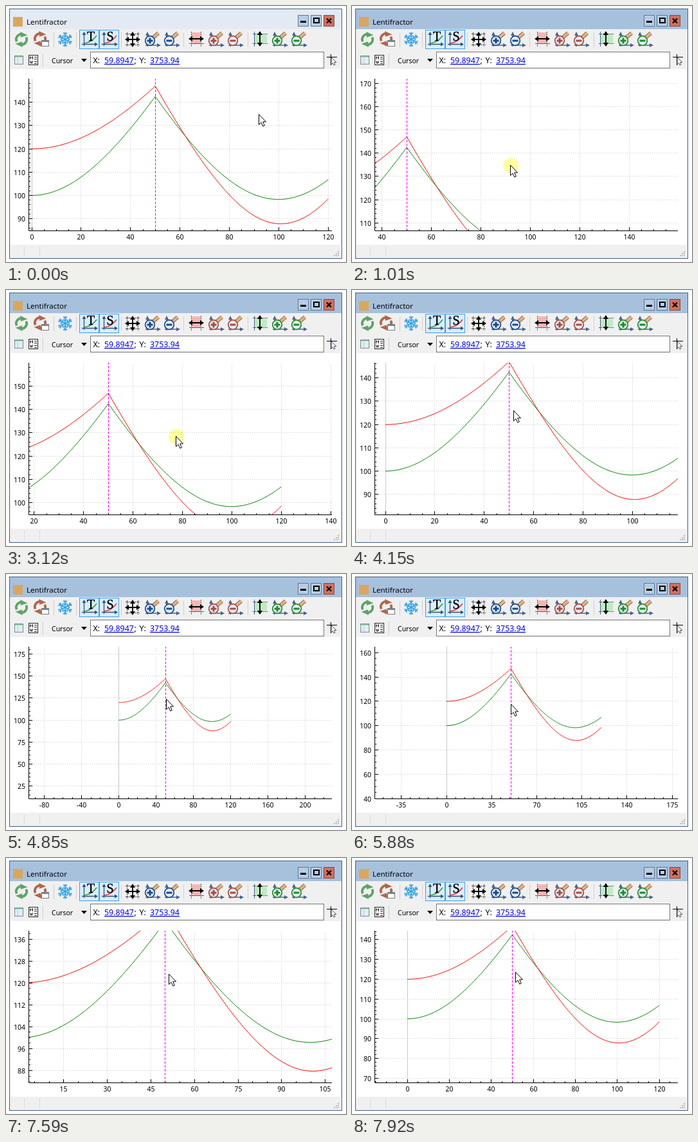
Write an HTML page with a canvas that moves like this. It is 529 px wide and 398 px high and loops after 8000 ms.

```html
<!DOCTYPE html>
<html lang="en">
<head>
<meta charset="utf-8">
<title>Lentifractor</title>
<style>
  html, body { margin: 0; width: 100%; height: 100%; overflow: hidden; background: #fff; }
  svg, canvas { position: absolute; left: 0; top: 0; width: 529px; height: 398px; }
  text { font-family: "Noto Sans", sans-serif; fill: #000; }
  .link { fill: #0000ee; text-decoration: underline; }
  .serif { font: 20px "Liberation Serif", serif; text-anchor: middle; stroke: #000; stroke-width: .4; }
  .line { fill: none; stroke: currentColor; }
  .crisp { shape-rendering: crispEdges; }
</style>
</head>
<body>
<svg viewBox="0 0 529 398">
  <defs>
    <g id="cycle" transform="rotate(-18)">
      <path class="line" stroke-width="3.800" d="M-8 1A8 8 0 0 1 4-7M8-1A8 8 0 0 1-4 7"/>
      <path fill="currentColor" d="M2-12 11-3.500H0ZM-2 12-11 3.500H0Z"/>
    </g>
    <g id="axes" fill="none" stroke="#48628c" stroke-width="1.500">
      <path d="M-8 11V-9M-11 9H10"/>
      <path d="M-11-6-8-12-5-6ZM7 6 13 9 7 12Z" fill="#48628c" stroke="none"/>
    </g>
    <g id="lens">
      <use href="#axes"/>
      <path d="M1-3 9-10" stroke="#8d6848" stroke-width="6"/>
      <path d="M1-3 9-10" stroke="#e2b184" stroke-width="4"/>
      <circle cx="-4" cy="2" r="7.300" fill="#e6edf3" stroke="currentColor" stroke-width="1.700"/>
      <path class="line" stroke-width="3" d="M-8.500 2H.5"/>
    </g>
    <g id="plus"><use href="#lens"/><path class="line" stroke-width="3" d="M-4-2.500V6.500"/></g>
    <path id="both" d="M-12 0-6-4V-.9H6V-4L12 0 6 4V.9H-6V4Z"/>
    <g id="arm"><path class="line" stroke-width="1.500" d="M0 0V-11.500M-3-10.500 0-7.500 3-10.500M-3-6.500 0-3.500 3-6.500"/></g>
    <g id="chart">
      <rect x=".5" y=".5" width="30" height="29" fill="#dcedfb" stroke="#3c9fef"/>
      <path d="M7.500 25V6M4 22.500H26" fill="none" stroke="#34507c" stroke-width="1.300"/>
      <path d="M4.500 8 7.500 3 10.500 8ZM24 19.500 29 22.500 24 25.500Z" fill="#34507c"/>
    </g>
  </defs>

  <!-- window -->
  <g class="crisp">
    <rect x="5.500" y="4.500" width="517" height="388" fill="#f0f0f0" stroke="#3f5f86"/>
    <rect id="bar" x="6" y="5" width="516" height="31"/>
    <rect x="7" y="98" width="514" height="273" fill="#fff"/>
    <path d="M28.500 374V389M52.500 374V389" stroke="#dadada"/>
    <path d="M74.500 41V64M109.500 41V64M179.500 41V64M276.500 41V64M376.500 41V64M57.500 74V95" stroke="#d0d0d0"/>
    <path d="M516 382h2M513 385h5M510 388h8" stroke="#bcbcbc" stroke-width="2" stroke-dasharray="2 1"/>
    <rect x="11" y="17" width="15" height="15" fill="#d9a75c"/>
    <g fill="#b8cde4" stroke="#5f7893">
      <rect x="454.500" y="14.500" width="16" height="17"/>
      <rect x="474.500" y="14.500" width="16" height="17"/>
      <rect x="494.500" y="14.500" width="16" height="17" fill="#d2705c" stroke="#8c473c"/>
    </g>
    <path d="M458 24.500H467" stroke="#000" stroke-width="3"/>
    <rect x="479" y="19" width="8" height="7" fill="none" stroke="#000" stroke-width="2"/>
  </g>
  <path d="M499 19.500 506 26.500M506 19.500 499 26.500" stroke="#000" stroke-width="2.200"/>
  <text x="32" y="28.500" font-size="11.500">Lentifractor</text>

  <!-- main toolbar -->
  <use href="#cycle" x="24" y="52" color="#5da466" transform="rotate(0)"/>
  <use href="#cycle" x="53" y="51" color="#b0664f"/>
  <g class="crisp"><rect x="55.500" y="53.500" width="11" height="9" fill="#fff" stroke="#777"/><path d="M56 55H66" stroke="#5a8fd0" stroke-width="2"/></g>
  <g transform="translate(92 52)" color="#2f9fe0">
    <use href="#arm"/><use href="#arm" transform="rotate(60)"/><use href="#arm" transform="rotate(120)"/>
    <use href="#arm" transform="rotate(180)"/><use href="#arm" transform="rotate(240)"/><use href="#arm" transform="rotate(300)"/>
  </g>
  <use href="#chart" x="114" y="37"/>
  <path d="M122 58Q134 56 141 46" fill="none" stroke="#2a9a3a" stroke-width="1.500"/>
  <text class="serif" x="132" y="54">T</text>
  <use href="#chart" x="145" y="37"/>
  <path d="M153 58Q165 56 172 46" fill="none" stroke="#e03030" stroke-width="1.500"/>
  <text class="serif" x="162" y="54">S</text>
  <g transform="translate(197 52)">
    <path class="crisp" d="M-8.500-11V11M8.500-11V11M-11-8.500H11M-11 8.500H11" stroke="#333" stroke-dasharray="2 1"/>
    <use href="#both"/><use href="#both" transform="rotate(90)"/>
  </g>
  <g color="#174a90"><use href="#plus" x="228" y="52"/><use href="#lens" x="258" y="52"/></g>
  <g transform="translate(296 51)">
    <rect x="-7" y="-10" width="14" height="17" fill="#f5b5b5"/>
    <path class="crisp" d="M-7.500-11V12M7.500-11V12" stroke="#555" stroke-dasharray="2 1"/>
    <path class="crisp" d="M-11 7.500H12" stroke="#48628c"/>
    <use href="#both"/>
  </g>
  <g color="#a54d42"><use href="#plus" x="327" y="52"/><use href="#lens" x="357" y="52"/></g>
  <g transform="translate(395 51)">
    <rect x="-9" y="-7" width="20" height="14" fill="#c0ebc4"/>
    <path class="crisp" d="M-11-7.500H12M-11 7.500H12" stroke="#555" stroke-dasharray="2 1"/>
    <path class="crisp" d="M-8.500-11V12" stroke="#48628c"/>
    <use href="#both" transform="rotate(90)"/>
  </g>
  <g color="#218a30"><use href="#plus" x="426" y="52"/><use href="#lens" x="456" y="52"/></g>

  <!-- cursor toolbar -->
  <g class="crisp">
    <rect x="13.500" y="77.500" width="13" height="13" fill="#fff" stroke="#6e8f9a"/>
    <path d="M14 79H26" stroke="#8cc99b" stroke-width="2"/>
    <path d="M14 82.500H26M14 85.500H26M14 88.500H26M18.500 78V90" stroke="#b5cdd8"/>
    <rect x="35.500" y="76.500" width="14" height="15" fill="#fff" stroke="#222"/>
    <path d="M44 79.500H48M44 82.500H48M44 86.500H48M44 89.500H48" stroke="#222"/>
    <rect x="131.500" y="71.500" width="363" height="25" fill="#fff" stroke="#777"/>
    <path d="M499 79.500H515M505.500 75V92" stroke="#000"/>
  </g>
  <path d="M37.500 83V78.500L39.500 81 41.500 78.500V83M37.500 85 38.500 89.500 39.500 86.500 40.500 89.500 41.500 85" fill="none" stroke="#222"/>
  <path d="M506 80V91L508.500 88.500 510 92 512 91 510.500 87.500H514Z" fill="#fff" stroke="#345" stroke-width=".9"/>
  <path d="M117 82H126L121.500 87Z"/>
  <text x="71" y="89" font-size="10.500">Cursor</text>
  <g font-size="12.400">
    <text x="135.500" y="89">X:</text><text class="link" x="153" y="89">59.8947</text>
    <text x="199.500" y="89">;</text><text x="207.500" y="89">Y:</text><text class="link" x="224" y="89">3753.94</text>
  </g>
</svg>
<canvas id="plot" width="529" height="398"></canvas>

<script>
const LOOP = 8000;
const L = 35, R = 507, T = 113, B = 350;
const ctx = document.getElementById('plot').getContext('2d');
const bar = document.getElementById('bar');

// Timeline: ox and oy are the pixels of x = 0 and y = 100, k is the wheel step.
const frames = [];
let view = { k: 0, ox: 40, oy: 294.5 };
const add = (t, x, y, held = false) => frames.push({ t, x, y, held, view });
const zoom = (t, x, y, k, ox, oy) => { view = { k, ox, oy }; add(t, x, y); };
function drag(gx, gy, moves) {
  const start = view;
  for (const [t, x, y] of moves) {
    view = { k: start.k, ox: start.ox + x - gx, oy: start.oy + y - gy };
    add(t, x, y, true);
  }
}

add(0, 394, 169);
drag(394, 169, [[330, 394, 169], [680, 322, 209], [1010, 247, 248], [1360, 184, 276], [1710, 141, 300]]);
add(2060, 143, 300);
add(2390, 90, 323);
drag(85, 323, [[2770, 155, 285], [3120, 265, 228], [3450, 350, 179]]);
add(3800, 270, 187);
add(4150, 252, 188);
zoom(4500, 252, 189, -3, 129.2, 245.4);
zoom(4850, 250, 195, -6, 175.6, 227.1);
add(5180, 252, 212);
add(5530, 251, 211);
zoom(5880, 248, 203, -4, 147, 235.7);
zoom(6210, 250, 197, -1, 83.6, 259.2);
zoom(6560, 253, 191, 2, -19.3, 297.8);
zoom(6890, 253, 185, 4, -123.9, 340.6);
zoom(7590, 254, 181, 1, 21.8, 279.4);
zoom(7920, 255, 178, -1, 86, 250);

// Beam radius: one hyperbola on each side of the lens at x = 50.
const beam = (w, c, d, x) => w * Math.hypot(1, (x - c) / d);
const green = x => x < 50 ? beam(100, 0, 49.25, x) : beam(98.3, 99.83, 47.48, x);
const red = x => x < 50 ? beam(120, 0, 70.67, x) : beam(87.8, 100.77, 37.81, x);

const PARTS = { 1: 5, 1.5: 3, 2: 4, 2.5: 5, 3: 3, 3.5: 5, 4: 4, 4.5: 3, 5: 5, 6: 3, 8: 4 };
function tickStep(range) {
  const raw = range / 6, mag = 10 ** Math.floor(Math.log10(raw)), m = raw / mag;
  const nice = m < 5 ? Math.floor(m * 2) / 2 : Math.floor(m / 2) * 2;
  return { step: nice * mag, parts: PARTS[nice] };
}
function ticks(lo, hi) {
  const { step, parts } = tickStep(hi - lo), list = [];
  const sub = step / parts;
  for (let i = Math.ceil(lo / sub); i * sub <= hi; i++) list.push({ v: i * sub, major: i % parts === 0 });
  return list;
}

const snap = p => Math.floor(p) + 0.5;
function stroke(color, points, dash = []) {
  ctx.strokeStyle = color;
  ctx.setLineDash(dash);
  ctx.beginPath();
  points.forEach(([x, y]) => ctx.lineTo(x, y));
  ctx.stroke();
}

function drawArrow(x, y, held) {
  if (held) {
    ctx.globalCompositeOperation = 'multiply';
    ctx.fillStyle = '#ffffa0';
    ctx.beginPath();
    ctx.arc(x, y, 12, 0, 7);
    ctx.fill();
    ctx.globalCompositeOperation = 'source-over';
  }
  const shape = [[0, 0], [0, 16], [3.5, 12.7], [6.3, 18.5], [8.8, 17.4], [6.2, 11.5], [11, 11.5]];
  ctx.beginPath();
  shape.forEach(([dx, dy]) => ctx.lineTo(x - 0.5 + dx, y - 0.5 + dy));
  ctx.closePath();
  ctx.fillStyle = '#fff';
  ctx.fill();
  ctx.strokeStyle = '#000';
  ctx.setLineDash([]);
  ctx.stroke();
}

function draw({ t, x, y, held, view: { k, ox, oy } }) {
  bar.setAttribute('fill', t ? '#a7c1dd' : '#e3eaf4');
  const zoomBy = 0.85 ** -k, sx = 3.845 * zoomBy, sy = 3.62 * zoomBy;
  const px = v => ox + v * sx, py = v => oy + (100 - v) * sy;
  const xs = ticks((L - ox) / sx, (R - ox) / sx);
  const ys = ticks(100 - (B - oy) / sy, 100 - (T + 1 - oy) / sy);

  ctx.clearRect(0, 0, 529, 398);
  ctx.lineWidth = 1;
  ctx.save();
  ctx.beginPath();
  ctx.rect(L, T, R - L, B - T);
  ctx.clip();
  const gridLine = (v, points) => stroke('#c8c8c8', points, v === 0 ? [] : [1, 2]);
  for (const { v, major } of xs) if (major) gridLine(v, [[snap(px(v)), B], [snap(px(v)), T]]);
  for (const { v, major } of ys) if (major) gridLine(v, [[L, snap(py(v))], [R, snap(py(v))]]);
  const samples = Array.from({ length: 241 }, (_, i) => i / 2);
  stroke('#008000', samples.map(v => [px(v), py(green(v))]));
  stroke('#ff0000', samples.map(v => [px(v), py(red(v))]));
  stroke('#ff00ff', [[snap(px(50)), B], [snap(px(50)), T]], [4, 2]);
  ctx.restore();

  const base = B - 0.5;
  stroke('#000', [[L + 0.5, T], [L + 0.5, base], [R, base]]);
  ctx.font = '10.5px "Noto Sans", sans-serif';
  ctx.fillStyle = '#000';
  ctx.textAlign = 'center';
  for (const { v, major } of xs) {
    const p = snap(px(v));
    stroke('#000', [[p, base], [p, B - (major ? 6 : 3)]]);
    if (major) ctx.fillText(Math.round(v), p, 363);
  }
  ctx.textAlign = 'right';
  for (const { v, major } of ys) {
    const p = snap(py(v));
    stroke('#000', [[L + 1, p], [L + 1 + (major ? 5 : 2), p]]);
    if (major) ctx.fillText(Math.round(v), 30, p + 4);
  }
  drawArrow(x, y, held);
}

let shown;
function tick() {
  const now = performance.now() % LOOP;
  const frame = frames.findLast(f => f.t <= now);
  if (frame !== shown) draw(shown = frame);
  requestAnimationFrame(tick);
}
tick();
</script>
</body>
</html>
```
